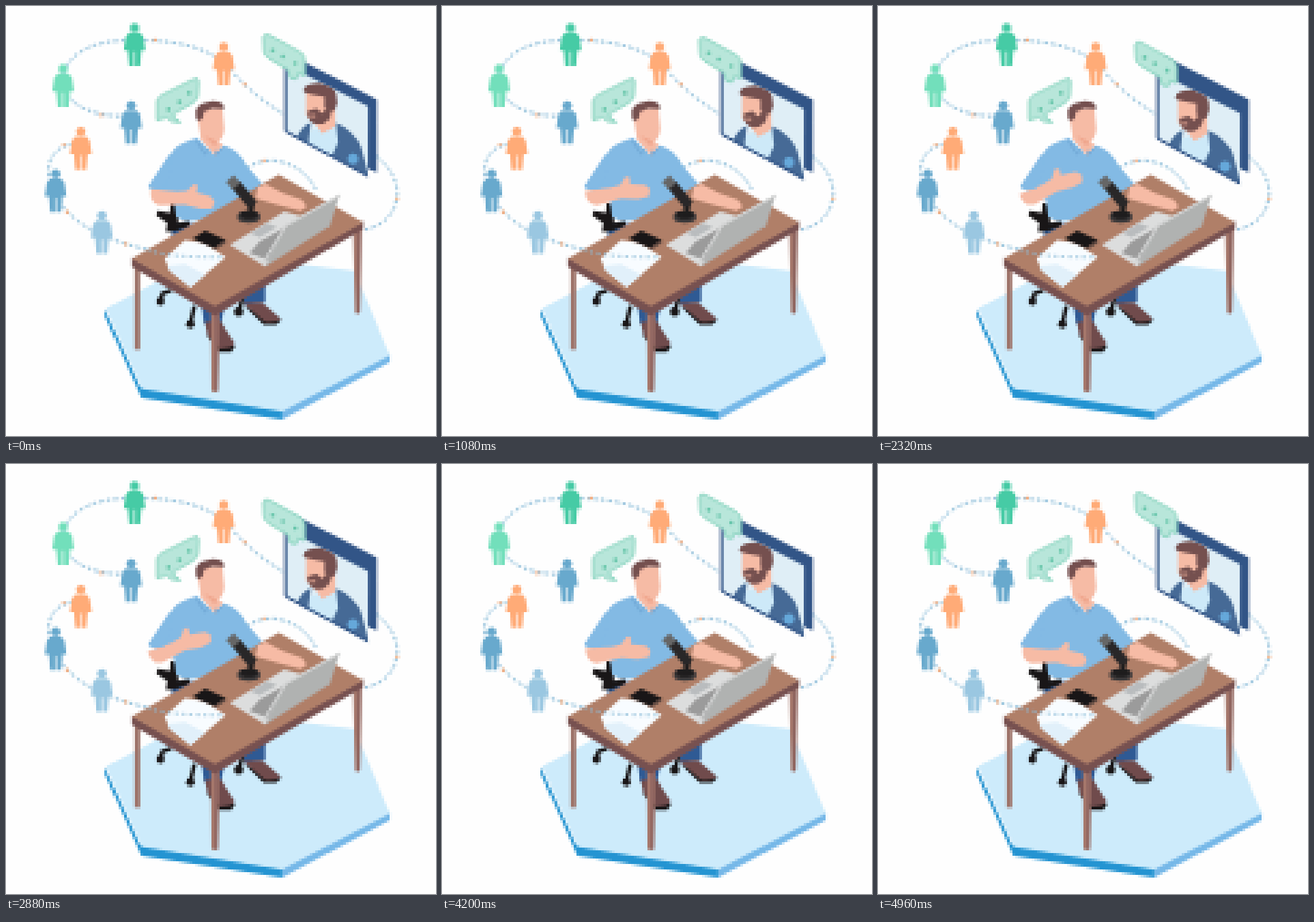
Recreate the animation shown at these times as an HTML page with a canvas. Size 630 px wide and 630 px high, loop 5 s.

```html
<!DOCTYPE html>
<html lang="en">
<head>
<meta charset="utf-8">
<title>Online meeting</title>
<style>
html, body { margin: 0; width: 100%; height: 100%; overflow: hidden; background: #fefefe; }
canvas { display: block; width: 100vw; height: 100vh; image-rendering: pixelated; }
</style>
</head>
<body>
<canvas width="157" height="157"></canvas>
<script>
const PERIOD = 5000, STAGE = 630, CELLS = 157;
const ctx = document.querySelector('canvas').getContext('2d');

const SKIN = '#f6bba5', SHIRT = '#83bae4', HAIR = '#75504f', NAVY = '#325587', BLACK = '#191617';

function fill(color, d) {
  ctx.fillStyle = color;
  ctx.fill(new Path2D(d));
}

function line(color, width, d, dash = []) {
  ctx.strokeStyle = color;
  ctx.lineWidth = width;
  ctx.setLineDash(dash);
  ctx.stroke(new Path2D(d));
  ctx.setLineDash([]);
}

function dot(color, x, y, rx, ry = rx) {
  ctx.fillStyle = color;
  ctx.beginPath();
  ctx.ellipse(x, y, rx, ry, 0, 0, 7);
  ctx.fill();
}

function person(color, x, y) {
  ctx.save();
  ctx.translate(x, y);
  dot(color, 0, 7, 7);
  fill(color, 'M-8 14H8L13 20L16 40H10L8 63H1V42H-1V63H-8L-10 40H-16L-13 20Z');
  ctx.restore();
}

function network() {
  const paths = [
    'M84 100Q100 50 188 50Q290 50 325 90Q365 135 408 159',
    'M84 118Q98 162 183 162',
    'M110 200Q62 203 62 245Q75 290 95 306Q130 340 207 357',
    'M543 220Q573 245 573 275Q570 318 525 328',
    'M343 243Q365 226 392 226Q435 231 454 268'
  ];
  for (const d of paths) {
    line('#ebf4f8', 3, d);
    line('#79b1d3', 3.6, d, [4.5, 6]);
  }
  const nodes = [[218, 50], [350, 115], [140, 160], [85, 203], [90, 302], [175, 349], [378, 226], [573, 282]];
  for (const [x, y] of nodes) dot('#f3a878', x, y, 2.6);

  person('#46cba5', 188, 25);
  person('#72dfbb', 84, 85);
  person('#ffab77', 319, 53);
  person('#68a9cd', 183, 139);
  person('#ffab77', 110, 177);
  person('#68a9cd', 73, 239);
  person('#9ac7e1', 141, 300);
}

function platform() {
  fill('#2494d2', 'M145 444L196 558L405 592V606L198 574L145 454Z');
  fill('#76b8e8', 'M405 592L562 509V522L405 606Z');
  fill('#cdebfb', 'M147 443L300 362L510 388L562 512L405 594L199 561Z');
}

function bubble(d, dots) {
  fill('#b8e6da', d);
  line('#8ad5c0', 3, d);
  for (const [x, y] of dots) dot('#68c6ab', x, y, 3.2);
}

function videoCall(drop) {
  fill(NAVY, 'M418 72L543 137V244L530 238L418 170Z');
  ctx.save();
  ctx.translate(0, drop);
  const panel = 'M409 85L530 147V249L409 183Z';
  fill('#dfeef6', panel);
  ctx.save();
  ctx.clip(new Path2D(panel));
  fill('#cde9f8', 'M444 184L462 178L484 172L500 240L440 210Z');
  fill('#466a96', 'M447 171L443 205L425 195Q434 176 447 171ZM483 171Q512 185 520 207L532 252L476 222L486 200Z');
  fill(SKIN, 'M440 127L470 122L482 150L482 176L464 187L453 172L440 160Z');
  fill(HAIR, 'M436 124Q438 112 461 113Q486 114 485 142L481 153L474 155L467 148V133Q448 131 438 127Z');
  fill(HAIR, 'M442 154L455 150L464 157L470 149L476 154Q474 174 456 173Q443 171 442 154Z');
  line('#e9a995', 3, 'M446 161H454');
  dot('#65a8da', 508, 224, 8);
  ctx.restore();
  line(NAVY, 4, 'M410 87V183L530 249');
  bubble('M377 46Q378 40 386 43L432 68Q438 72 438 79V102L428 99L426 107L417 106L414 94L384 76Q378 72 378 65Z',
    [[391, 65], [406, 74], [424, 84]]);
  ctx.restore();
}

function chairAndLegs() {
  line(BLACK, 6, 'M242 417L229 422L226 431M276 440L270 466M347 428L341 448');
  dot(BLACK, 226, 433, 6);
  dot(BLACK, 270, 466, 6);
  dot(BLACK, 341, 448, 7);
  fill('#2f5a94', 'M287 440H320L314 472L290 465ZM346 420L380 408V434L350 438Z');
  fill(BLACK, 'M293 480L312 507H330L336 498ZM350 440L378 467H396L404 460Z');
  fill('#704b4c', 'M291 463L314 461L335 494Q333 502 314 502L296 484ZM347 435L375 434L403 458Q396 465 380 463Z');
  fill('#2f5a94', 'M244 318L285 320L262 336H242Z');
  fill(BLACK, 'M241 288L252 292V318L268 314L270 322L247 330L234 331L236 318L220 307L222 300L240 303ZM327 280H334V292H327Z');
}

function speaker() {
  fill(SHIRT, 'M280 193Q255 200 246 210L208 266L246 284L249 309Q272 322 300 308L336 287L366 283L377 262L352 233Q342 212 320 204L305 218Z');
  fill(SKIN, 'M284 190L309 196L318 204L306 219L299 207Z');
  line('#70a7d5', 3, 'M279 197L291 216L302 206L308 218L318 206');
  fill(SKIN, 'M289 150L317 149L320 180Q318 198 309 198V207L304 216L286 196L281 166Z');
  fill('#efa78e', 'M291 190L309 198L306 206Z');
  fill(HAIR, 'M278 163V152Q284 141 303 139Q320 139 320 151L302 150L290 155L288 165L281 169Z');
}

function desk() {
  fill('#9d7268', 'M188 376H196V503H188Z');
  fill('#a5776b', 'M300 446H312L310 565H301ZM508 322H520L518 450H511Z');
  fill('#8f6560', 'M306 446H312L310 565H306ZM514 322H520L518 450H514Z');
  fill('#775150', 'M184 368L306 434L523 315V327L306 454L184 382Z');
  fill('#b07f68', 'M400 247L523 317L306 440L184 370Z');

  fill('#f8fcff', 'M262 343L290 347L322 368L270 412L240 388L232 370Z');
  fill('#e1f0fa', 'M236 381L262 378L292 394L270 412L240 388Z');
  line('#8fbdd9', 3.6, 'M207 357Q235 369 320 368', [4.5, 6]);
  fill(BLACK, 'M273 341L292 329L322 343L305 355Z');
  fill('#55423d', 'M305 355L322 343V347L307 357Z');

  fill('#dcdddd', 'M328 350L408 301L440 310L380 382Z');
  fill('#b9bcbe', 'M358 333L383 318L397 324L372 339Z');
  fill('#9b9b9b', 'M357 362L372 345L408 325L385 372Z');
  fill('#b0b2b1', 'M488 277L474 323L380 382L410 322Z');
  line('#d3d4d4', 4, 'M488 278L410 322L376 378');

  fill(SKIN, 'M369 265L381 261L406 274L434 284L441 294L432 300L397 291L366 282Z');

  dot('#3b393a', 356, 309, 17, 9);
  dot('#1f1d1e', 356, 306, 13, 6);
  line('#1f1d1e', 8, 'M361 287L358 306');
  line('#292728', 15, 'M337 262L362 292');
  line('#666', 15, 'M328 253L338 264');
}

function gesture(angle) {
  ctx.save();
  ctx.translate(224, 282);
  ctx.rotate(-angle);
  ctx.translate(-224, -282);
  fill(SKIN, 'M212 268L250 272L265 271L275 261L281 263L279 273L300 279L306 287L302 297L285 297L262 291L224 292Q209 288 212 268Z');
  ctx.restore();
  fill(SHIRT, 'M240 216L208 265L230 269L242 240Z');
}

function draw(now) {
  const phase = now % PERIOD / PERIOD;
  const drop = 11 * (1 - Math.cos(phase * 2 * Math.PI)) / 2;
  const lift = 1 - Math.abs(1 - 2 * phase);
  ctx.setTransform(CELLS / STAGE, 0, 0, CELLS / STAGE, 0, 0);
  ctx.fillStyle = '#fefefe';
  ctx.fillRect(0, 0, STAGE, STAGE);
  network();
  platform();
  videoCall(drop);
  chairAndLegs();
  speaker();
  bubble('M221 140Q222 134 228 131L274 108Q282 104 282 111L281 132Q280 138 274 142L243 160L255 170Q240 171 235 163L221 167Z',
    [[238, 152], [254, 141], [268, 128]]);
  desk();
  gesture(lift * 0.54);
}

const start = performance.now();
function loop() {
  draw(performance.now() - start);
  requestAnimationFrame(loop);
}
loop();
</script>
</body>
</html>
```
